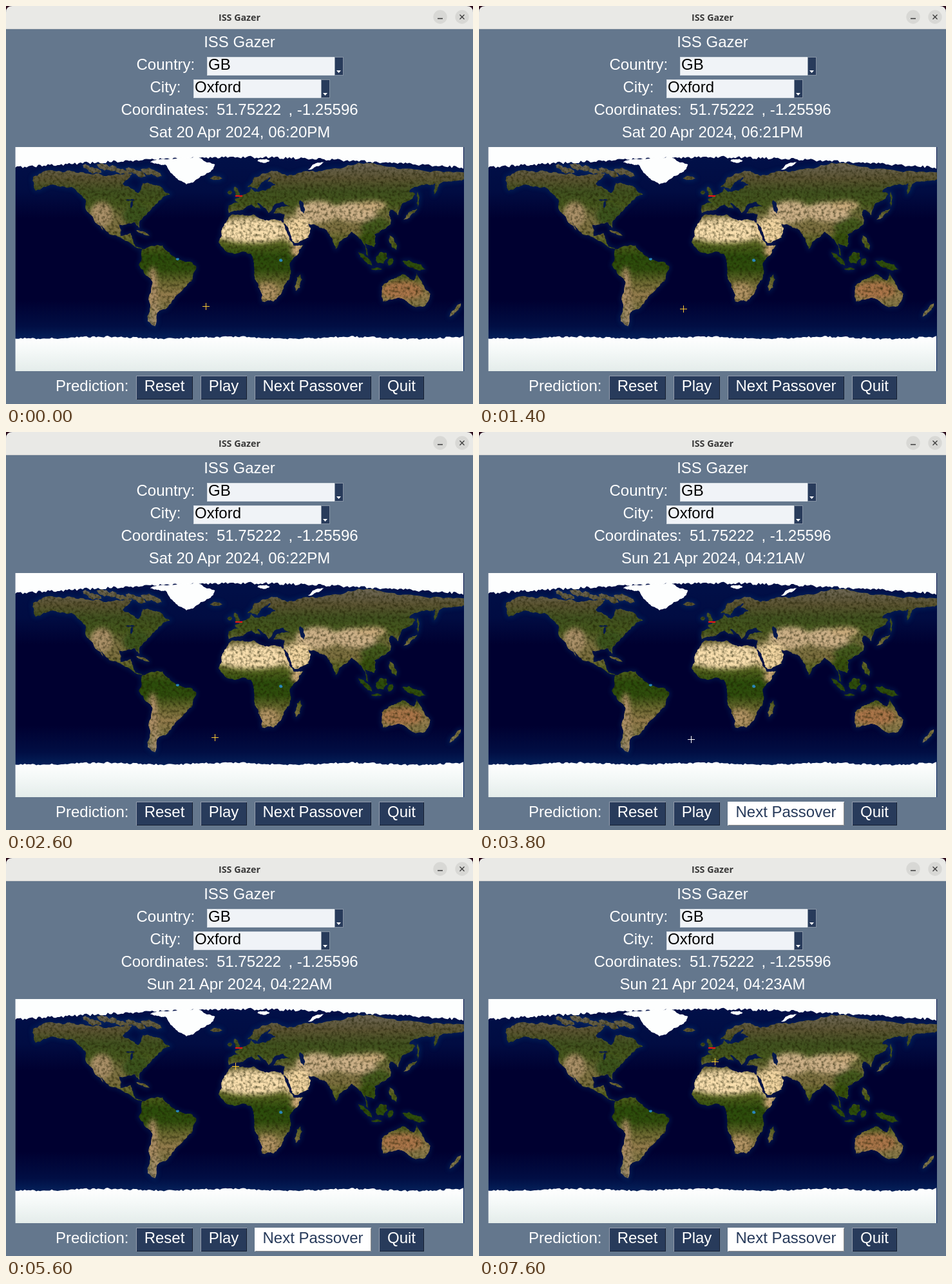
An HTML page for the animation above (8 s loop, 725 px wide and 618 px high).

```html
<!DOCTYPE html>
<html lang="en">
<head>
<meta charset="utf-8">
<title>ISS Gazer</title>
<style>
html, body { margin: 0; width: 100%; height: 100%; overflow: hidden; background: #2b0a1a; }
svg { display: block; width: 725px; height: 618px; font: 24px "Liberation Sans", sans-serif; white-space: pre; }
</style>
</head>
<body>
<svg id="stage" viewBox="0 0 725 618"></svg>
<script>
let seed = 7;
const rnd = () => (seed = seed * 16807 % 2147483647) / 2147483647;
const jitter = size => (rnd() - .5) * size;

// Longitude and latitude to stage pixels on an equirectangular map.
const SCALE = 696 / 360;
const px = lon => 363 + lon * SCALE;
const py = lat => 393 - lat * SCALE;

// Closed outline through key points, roughened by midpoint displacement.
function coast(points) {
  for (let pass = 0; pass < 4; pass++) {
    points = points.flatMap(([x, y], i) => {
      const [u, v] = points[(i + 1) % points.length];
      const off = jitter(Math.min(.3, 2.4 / (Math.hypot(u - x, v - y) || 1)));
      return [[x, y], [(x + u) / 2 - (v - y) * off, (y + v) / 2 + (u - x) * off]];
    });
  }
  return `<path d="M${points.map(([x, y]) => px(x).toFixed(1) + ' ' + py(y).toFixed(1)).join('L')}Z"/>`;
}
const parse = text => text.split(',').map(p => p.trim().split(' ').map(Number));

function island(lon, lat, length, width, tilt = 0) {
  const a = tilt * Math.PI / 180;
  return coast([0, 1, 2, 3, 4, 5].map(i => {
    const u = Math.cos(i * Math.PI / 3) * length / 2, v = Math.sin(i * Math.PI / 3) * width / 2;
    return [lon + u * Math.cos(a) - v * Math.sin(a), lat + u * Math.sin(a) + v * Math.cos(a)];
  }));
}

const northAmerica = `-166 66,-156 71,-128 70,-95 68,-86 69,-94 60,-82 53,-78 61,-65 59,-56 52,-65 47,-70 42,-76 35,
-81 30,-81 25,-84 30,-97 28,-96 19,-88 21,-84 10,-78 8,-94 16,-105 20,-113 31,-110 23,-118 34,-124 41,-124 48,-135 58,-150 60,-164 55`;
const southAmerica = '-78 8,-62 11,-50 0,-35 -6,-39 -18,-48 -27,-57 -37,-65 -42,-68 -54,-74 -50,-70 -19,-81 -5';
const africa = '-6 36,11 36,20 31,33 31,43 11,51 11,40 -4,40 -16,35 -24,27 -34,18 -34,12 -16,9 4,-8 5,-17 14,-14 25';
const eurasia = `-9 43,-1 45,-4 48,8 54,9 57,12 54,21 55,29 60,22 62,25 66,17 61,14 56,6 58,12 66,26 71,41 67,36 65,
45 68,70 72,104 77,140 72,182 69,178 63,160 60,156 52,157 61,140 58,136 54,141 52,129 42,127 35,121 40,120 35,121 28,
108 20,108 10,100 13,103 2,98 15,90 22,80 14,77 8,72 20,66 25,50 30,57 25,55 17,44 13,35 29,36 36,27 37,30 41,41 42,
35 46,28 44,23 37,14 45,17 40,9 44,0 39,-9 37`;
const australia = '114 -22,115 -34,131 -32,140 -38,148 -38,153 -28,142 -11,140 -17,131 -12';
const greenland = '-72 78,-35 83,-20 76,-24 70,-43 60,-53 67,-60 76';

const islands = [
  island(-2.5, 54, 9, 4, 110), island(-8, 53.5, 4, 3), island(-19, 65, 10, 3),
  island(47, -19, 14, 5, 75), island(137, 36, 14, 3, 40), island(143, 48, 13, 2, 90),
  island(123, 13, 13, 5, 115), island(114, 1, 11, 9, 50), island(101, 0, 16, 4, -45), island(110, -8, 9, 1.5),
  island(121, -2, 7, 4, 60), island(140, -5, 20, 6, -20), island(173, -41, 14, 3, 50), island(-78, 21, 12, 2, -20)
];
// Scattered arctic archipelago.
for (let i = 0; i < 14; i++) {
  const east = i / 13;
  islands.push(island(-123 + 56 * east, 72.5 - 4 * east * east + jitter(4), 9 + jitter(6), 4 + jitter(2), -25));
}
const land = [northAmerica, southAmerica, africa, eurasia, australia].map(s => coast(parse(s))).join('') + islands.join('');

// Ground colour by latitude, from north to south in equal steps.
const climate = ['#6b6450', '#5b5432', '#40511f', '#45571d', '#786f40', '#7d7040', '#55621f', '#2b4c0b', '#2f4d0c',
  '#6d6a32', '#947c4d', '#7c7443', '#8b8068'];
const climateStops = climate.map((c, i) => `<stop offset="${i / 12}" stop-color="${c}"/>`).join('');
const region = (lon, lat, rx, ry, fill) =>
  `<ellipse cx="${px(lon)}" cy="${py(lat)}" rx="${rx * SCALE}" ry="${ry * SCALE}" fill="${fill}"/>`;
const regions = [
  region(-82, 35, 12, 9, '#3a531a'), region(110, 25, 13, 9, '#43591c'), region(104, 14, 9, 8, '#35500f'),
  region(-111, 36, 9, 10, '#aa9068'), region(-70, -24, 4, 18, '#af9068'), region(-67, -44, 4, 9, '#a48d66'),
  region(22, -26, 9, 7, '#b39465'), region(47, 7, 6, 6, '#cba877'), region(62, 38, 17, 9, '#ccb087'),
  region(92, 38, 18, 8, '#cdb188'), region(106, 43, 12, 4, '#c9aa7c'), region(10, 23, 32, 10, '#f9dfae'),
  region(46, 23, 13, 11, '#f3d6a2'), region(130, -25, 17, 7, '#aa744a')
].join('');

const MAP = { x: 14.5, y: 219, w: 696.5, h: 348 };
const edge = fn => Array.from({ length: 233 }, (_, i) => 14 + i * 3).map(x => `L${x} ${fn(x).toFixed(1)}`).join('');
const northIce = 'M14 218' + edge(x => py(82 - 8.5 * Math.abs((x - 363) / 348) ** 1.5) + jitter(4)) + 'V218Z';
const southIce = 'M14 568' + edge(x => 515 + 1.5 * Math.sin(x / 31) + jitter(3)) + 'V568Z';

const label = (text, x, y, attrs = '') => `<text x="${x}" y="${y}" ${attrs}>${text}</text>`;
const rect = (x, y, w, h, fill, attrs = '') =>
  `<rect x="${x}" y="${y}" width="${w}" height="${h}" fill="${fill}" ${attrs}/>`;
const mapRect = (fill, attrs) => rect(MAP.x, MAP.y, MAP.w, MAP.h, fill, attrs);
const combo = (text, x, y) => rect(x, y, 198, 29, '#d3dae1') + rect(x + 1, y + 1, 197, 27, '#f0f3f7') +
  rect(x + 198, y, 14, 29, '#8592a3') + rect(x + 199, y + 1, 12, 27, '#283b5b') +
  `<path d="M${x + 201} ${y + 21}h7l-3.5 4z" fill="#fff"/>` + label(text, x + 2, y + 20, 'fill="#000"');
const button = (text, x, w, id) => rect(x, 574, w, 37, '#283b5b', `id="${id}"`) +
  `<g fill="none"><path d="M${x + .5} 611V574.5H${x + w}" stroke="#fff" stroke-opacity=".5"/>
   <path d="M${x + 1} 610.5H${x + w - .5}V575" stroke="#000" stroke-opacity=".45"/></g>` +
  label(text, x + w / 2, 598, `text-anchor="middle" id="${id}Text"`);

const stage = document.getElementById('stage');
stage.innerHTML = `
<defs>
  <clipPath id="mapClip">${mapRect('#000')}</clipPath>
  <clipPath id="landClip">${land}</clipPath>
  <clipPath id="dateClip">${rect(221, 180, 284, 32, '#000')}</clipPath>
  <filter id="soft" x="-5%" y="-5%" width="110%" height="110%"><feGaussianBlur stdDeviation="3.5"/></filter>
  <filter id="grain" x="0" y="0" width="100%" height="100%" color-interpolation-filters="sRGB">
    <feTurbulence type="fractalNoise" baseFrequency=".22" numOctaves="3" seed="3"/>
    <feColorMatrix values="0 0 0 0 .1 0 0 0 0 .1 0 0 0 0 0 1.4 0 0 0 -.58"/>
  </filter>
  <linearGradient id="climate" gradientUnits="userSpaceOnUse" x1="0" x2="0" y1="${py(75)}" y2="${py(-50)}">${climateStops}</linearGradient>
  <linearGradient id="sea" x2="0" y2="1">
    <stop offset="0" stop-color="#01114a"/><stop offset=".2" stop-color="#010c42"/>
    <stop offset=".32" stop-color="#000030"/><stop offset=".68" stop-color="#000030"/>
    <stop offset=".8" stop-color="#010e44"/><stop offset=".86" stop-color="#04215a"/>
  </linearGradient>
  <linearGradient id="ice" x2="0" y2="1">
    <stop offset="0" stop-color="#fff"/><stop offset=".4" stop-color="#f5f9f8"/><stop offset="1" stop-color="#e4ecea"/>
  </linearGradient>
</defs>
<path d="M0 618V10Q0 0 10 0H715Q725 0 725 10V618Z" fill="#64778d"/>
<path d="M0 36V10Q0 0 10 0H715Q725 0 725 10V36Z" fill="#e9e9e6"/>
${rect(0, 35, 725, 1, '#d2d3d2')}
${label('ISS Gazer', 362.5, 23, 'text-anchor="middle" fill="#393939" font-family="Open Sans, sans-serif" font-size="14.3" font-weight="700"')}
<g fill="#d8d8d5"><circle cx="674" cy="17" r="10.7"/><circle cx="708" cy="17" r="10.7"/></g>
<path d="M670 19.5h8M704.5 13.5l7 7m0-7l-7 7" stroke="#393939" stroke-width="1.3"/>
<g fill="#fff">
  ${label('ISS Gazer', 362.5, 64, 'text-anchor="middle"')}
  ${label('Country:', 202.5, 99)}${combo('GB', 312, 79)}
  ${label('City:', 223.5, 134)}${combo('Oxford', 291, 114)}
  ${label('Coordinates:', 178.5, 169)}${label('51.75222', 327, 169)}${label(', -1.25596', 438.5, 169)}
  <g id="dateBox"><text id="date" y="204"></text></g>
  ${label('Prediction:', 77, 598)}
  ${button('Reset', 202, 88, 'reset')}${button('Play', 302, 72, 'play')}
  ${button('Next Passover', 386, 181, 'next')}${button('Quit', 579, 70, 'quit')}
</g>
<g clip-path="url(#mapClip)">
  ${mapRect('url(#sea)')}
  <g fill="none" stroke="#0b4684" stroke-width="4" opacity=".4" filter="url(#soft)">${land}</g>
  <g fill="url(#climate)">${land}</g>
  <g clip-path="url(#landClip)">
    <g filter="url(#soft)">${regions}</g>
    ${mapRect('#000', 'filter="url(#grain)"')}
  </g>
  <g fill="#06194d">${island(50, 42, 11, 4, 105)}${island(-87, 44, 6, 2, 80)}${island(-88, 47.5, 7, 1.5)}</g>
  <g fill="#2a86b8">${island(33, -1, 3, 3)}${island(-50, 0, 3, 2)}</g>
  <g fill="#fdfefe">
    <path d="${northIce}"/>${coast(parse(greenland))}${island(61, 75, 14, 2.5, 25)}${island(19, 79, 10, 3)}
  </g>
  <path d="${southIce}" fill="url(#ice)"/>
  <path d="M356 295H367" stroke="#f01414" stroke-width="2"/>
  <path id="cross" d="M-5.5 0H5.5M0 -5.5V5.5" fill="none"/>
</g>`;

const [cross, date, dateBox, next, nextText] =
  ['cross', 'date', 'dateBox', 'next', 'nextText'].map(id => document.getElementById(id));
const LOOP = 8000, TICK = 200;
const HOVER = 3400, SKIP = 3600, JUMP = 4000;
const PAUSES = [3200, 4200, 5400, 6600, 7800];

function draw(time) {
  let t = Math.floor(time % LOOP / TICK) * TICK;
  if (PAUSES.includes(t)) t -= TICK;

  const run = Math.min(t, HOVER), after = t - JUMP;
  const [x, y] = t < JUMP ? [310 + run * .0056, 466 + run * .0033] : [348 + after * .0051, 329.4 - after * .0037];
  cross.setAttribute('transform', `translate(${Math.floor(x) + .5} ${Math.floor(y) + .5})`);
  cross.setAttribute('stroke', t >= HOVER && t < JUMP ? '#fff' : '#fcc832');

  const skipped = t >= SKIP;
  date.textContent = skipped
    ? `Sun 21 Apr 2024, 04:${21 + Math.max(0, Math.floor((t - 3700) / 1340))}AM`
    : `Sat 20 Apr 2024, 06:${20 + Math.floor(run / 1300)}PM`;
  // The label keeps its old width until the layout catches up.
  const stale = skipped && t < JUMP;
  date.setAttribute('x', stale ? 221 : 362.5);
  date.setAttribute('text-anchor', stale ? 'start' : 'middle');
  dateBox.setAttribute('clip-path', stale ? 'url(#dateClip)' : 'none');

  const hover = t >= HOVER;
  next.setAttribute('fill', hover ? '#fff' : '#283b5b');
  nextText.setAttribute('fill', hover ? '#283b5b' : '#fff');
}

const start = performance.now();
(function frame() {
  draw(performance.now() - start);
  requestAnimationFrame(frame);
})();
</script>
</body>
</html>
```
